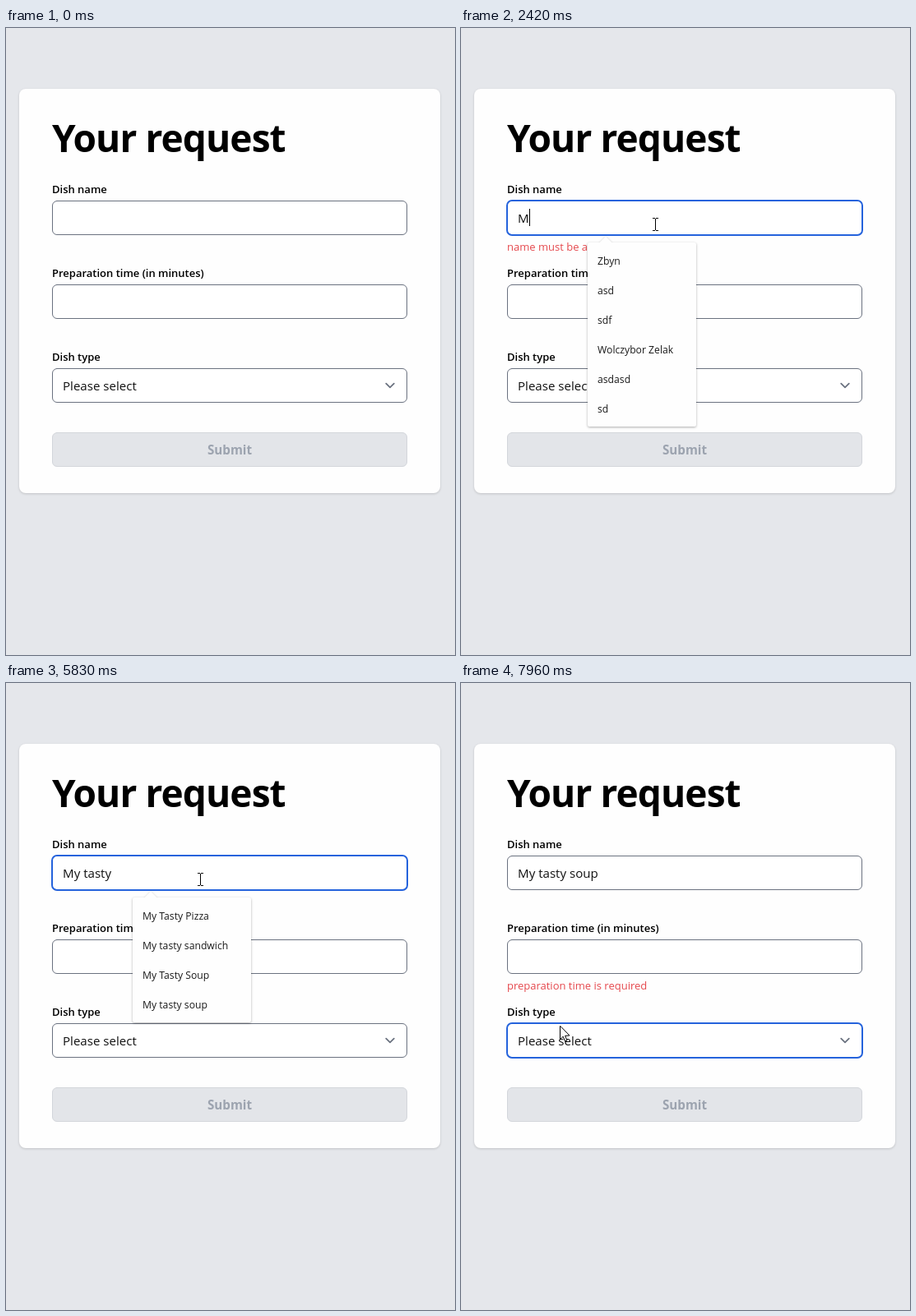
An HTML page with a canvas for the animation above (8 s loop, 546 by 763 pixels).

```html
<!DOCTYPE html>
<html lang="en">
<head>
<meta charset="utf-8">
<title>Your request</title>
<style>
  html, body { margin: 0; width: 100%; height: 100%; overflow: hidden; background: #e5e7eb; }
  canvas { display: block; width: 546px; height: 763px; }
</style>
</head>
<body>
<canvas id="stage"></canvas>
<script>
const W = 546, H = 763, LOOP = 8000;
const canvas = document.getElementById('stage');
const ctx = canvas.getContext('2d');
const ratio = window.devicePixelRatio || 1;
canvas.width = W * ratio;
canvas.height = H * ratio;

const FAMILY = '"Open Sans", "Noto Sans", sans-serif';
const GREY = '#6b7280', BLUE = '#2563dc', RED = '#e5484d';
const INPUT_FONT = '400 15.1px ';

const DISH = 'My tasty soup';
const KEY_TIMES = [2420, 3890, 4250, 4420, 4630, 5040, 5210, 5330, 5910, 6000, 6150, 6360, 6480];
const CARET_OFF = [[1390, 1930], [3140, 3640], [5830, 5910], [7020, 7100]];
const FOCUS_NAME = 850, FOCUS_TIME = 7100, FOCUS_TYPE = 7630;

// start time, right edge, suggestions
const LISTS = [
  [850, 286, ['Zbyn', 'asd', 'sdf', 'Wolczybor Zelak', 'asdasd', 'sd']],
  [2500, 310, ['My Tasty Pizza', 'My cool dish', 'My dish', 'my pizz', 'my pizza', 'my super tasty pizza']],
  [4420, 298, ['My Tasty Pizza', 'My tasty sandwich', 'My Tasty Soup', 'My tasty soup']],
  [6000, 298, ['My tasty sandwich', 'My Tasty Soup', 'My tasty soup']],
  [6150, 274, ['My Tasty Soup', 'My tasty soup']]
];

// time, x, y of the pointer
const PATH_IN = [[40, 497, 752], [220, 405, 570], [400, 300, 390], [560, 228, 325], [680, 227, 272], [770, 235, 239], [1020, 236, 239]];
const PATH_OUT = [[7630, 236, 239], [7740, 214, 275], [7850, 163, 350], [7960, 120, 417]];

const within = (t, a, b) => t >= a && t < b;

function text(str, x, y, font, color, spacing = 0, align = 'left') {
  ctx.font = font + FAMILY;
  ctx.letterSpacing = spacing + 'px';
  ctx.fillStyle = color;
  ctx.textAlign = align;
  ctx.fillText(str, x, y);
}

function box(x, y, w, h, r, fill, stroke, line = 1) {
  const d = stroke ? line / 2 : 0;
  ctx.beginPath();
  ctx.roundRect(x + d, y + d, w - 2 * d, h - 2 * d, r);
  if (fill) { ctx.fillStyle = fill; ctx.fill(); }
  if (stroke) { ctx.strokeStyle = stroke; ctx.lineWidth = line; ctx.stroke(); }
}

function shadow(color, blur, dy) {
  ctx.shadowColor = color;
  ctx.shadowBlur = blur * ratio;
  ctx.shadowOffsetY = dy * ratio;
}

function field(y, focused) {
  if (focused) box(55, y - 1, 434, 44, 6, '#fff', BLUE, 2);
  else box(56, y, 432, 42, 5.5, '#fff', GREY);
}

function shape(points) {
  ctx.beginPath();
  points.forEach(([x, y]) => ctx.lineTo(x, y));
}

function drawCard() {
  ctx.fillStyle = '#e5e7eb';
  ctx.fillRect(0, 0, W, H);
  ctx.save();
  shadow('rgba(0,0,0,.16)', 3, 1);
  box(16, 74, 512, 492, 8, '#fefefe');
  ctx.restore();
  text('Your request', 56, 150.5, '700 46px ', '#000', -0.9);
  text('Dish name', 56, 201, '600 13px ', '#000');
  text('Preparation time (in minutes)', 56, 303, '600 13px ', '#000');
  text('Dish type', 56, 405, '600 13px ', '#000');
  box(56, 492, 432, 42, 5.5, '#e3e5e9', '#d3d6db');
  text('Submit', 272, 519, '700 15.2px ', '#9ca3af', 0, 'center');
}

function drawCaret(x, y) {
  ctx.fillStyle = '#000';
  ctx.fillRect(Math.round(x), y, 1, 21);
}

function drawSpinner() {
  ctx.fillStyle = '#efefef';
  ctx.fillRect(460, 322, 15, 23);
  ctx.fillStyle = '#444';
  shape([[463.5, 330], [467.5, 326], [471.5, 330]]);
  ctx.fill();
  shape([[463.5, 337], [467.5, 341], [471.5, 337]]);
  ctx.fill();
}

function drawFields(t) {
  const typed = DISH.slice(0, KEY_TIMES.filter(k => k <= t).length);
  const caretOn = !CARET_OFF.some(([a, b]) => within(t, a, b));
  const onName = within(t, FOCUS_NAME, FOCUS_TIME);
  const onTime = within(t, FOCUS_TIME, FOCUS_TYPE);

  field(210, onName);
  text(typed, 69, 237, INPUT_FONT, '#111');
  if (onName && caretOn) drawCaret(69 + ctx.measureText(typed).width, typed ? 220 : 221);

  field(312, onTime);
  if (onTime) {
    drawSpinner();
    drawCaret(69, 323);
  }

  field(414, t >= FOCUS_TYPE);
  text('Please select', 69, 441, INPUT_FONT, '#111');
  shape([[462.2, 432.6], [467, 437.4], [471.8, 432.6]]);
  ctx.strokeStyle = GREY;
  ctx.lineWidth = 1.8;
  ctx.lineCap = ctx.lineJoin = 'round';
  ctx.stroke();

  if (within(t, 2420, 4630)) text('name must be at least 5 characters', 56, 271, '400 13px ', RED);
  if (t >= FOCUS_TYPE) text('preparation time is required', 56, 373, '400 13px ', RED);
}

function drawList(t) {
  const list = LISTS.filter(l => l[0] <= t).pop();
  const fade = t < FOCUS_TIME ? 0 : Math.floor((t - FOCUS_TIME) / 40) * 40 / 145;
  if (!list || fade >= 1) return;
  const [, right, items] = list;
  const bottom = 269 + items.length * 36;
  const cx = (154 + right) / 2, cy = (261 + bottom) / 2;

  ctx.save();
  ctx.globalAlpha = t < FOCUS_TIME ? 1 : 0.9 * (1 - fade);
  ctx.translate(cx, cy);
  ctx.scale(1 - 0.04 * fade, 1 - 0.04 * fade);
  ctx.translate(-cx, -cy);

  ctx.save();
  shadow('rgba(0,0,0,.32)', 3, 1);
  ctx.beginPath();
  ctx.roundRect(154, 261, right - 154, bottom - 261, 2);
  ctx.moveTo(168, 261.5);
  ctx.lineTo(176, 253.5);
  ctx.lineTo(184, 261.5);
  ctx.closePath();
  ctx.fillStyle = '#fefefe';
  ctx.fill();
  ctx.restore();

  items.forEach((s, i) => text(s, 166, 288 + i * 36, '400 12.2px ', '#1a1a1a'));
  ctx.restore();
}

function spline(a, b, c, d, u) {
  return 0.5 * (2 * b + (c - a) * u + (2 * a - 5 * b + 4 * c - d) * u * u + (3 * b - a - 3 * c + d) * u * u * u);
}

function along(path, t) {
  const last = path.length - 1;
  if (t >= path[last][0]) return path[last].slice(1);
  const i = Math.max(0, path.findIndex(p => p[0] > t) - 1);
  const u = (t - path[i][0]) / (path[i + 1][0] - path[i][0]);
  const at = k => path[Math.min(last, Math.max(0, k))];
  return [1, 2].map(n => spline(at(i - 1)[n], at(i)[n], at(i + 1)[n], at(i + 2)[n], u));
}

function drawBeam() {
  ctx.fillStyle = '#000';
  ctx.fillRect(0, -7, 1, 14);
  for (const y of [-8, 7]) {
    ctx.fillRect(-3, y, 3, 1);
    ctx.fillRect(1, y, 3, 1);
  }
}

function drawArrow() {
  shape([[0.5, 0.5], [0.5, 16.8], [4.2, 13.2], [6.6, 19], [9, 18], [6.6, 12.3], [11.6, 12]]);
  ctx.closePath();
  ctx.fillStyle = '#fff';
  ctx.strokeStyle = '#000';
  ctx.lineWidth = 1;
  ctx.lineJoin = 'miter';
  ctx.fill();
  ctx.stroke();
}

function drawHalo(t) {
  if (!within(t, 850, 1020)) return;
  ctx.save();
  ctx.globalCompositeOperation = 'multiply';
  ctx.globalAlpha = t < 930 ? 1 : 0.45;
  ctx.fillStyle = '#fdfd70';
  ctx.beginPath();
  ctx.arc(233, 238, 12, 0, Math.PI * 2);
  ctx.fill();
  ctx.restore();
}

function drawPointer(t) {
  if (t < 40) return;
  const [x, y] = along(t < FOCUS_TYPE ? PATH_IN : PATH_OUT, t).map(Math.round);
  const overInput = x > 56 && x < 488 && (within(y, 210, 252) || within(y, 312, 354));
  ctx.save();
  ctx.translate(x, y);
  if (overInput) drawBeam();
  else drawArrow();
  ctx.restore();
}

function render(t) {
  ctx.setTransform(ratio, 0, 0, ratio, 0, 0);
  drawCard();
  drawFields(t);
  drawList(t);
  drawHalo(t);
  drawPointer(t);
}

const start = performance.now();
function tick() {
  render((performance.now() - start) % LOOP);
  requestAnimationFrame(tick);
}
tick();
</script>
</body>
</html>
```
